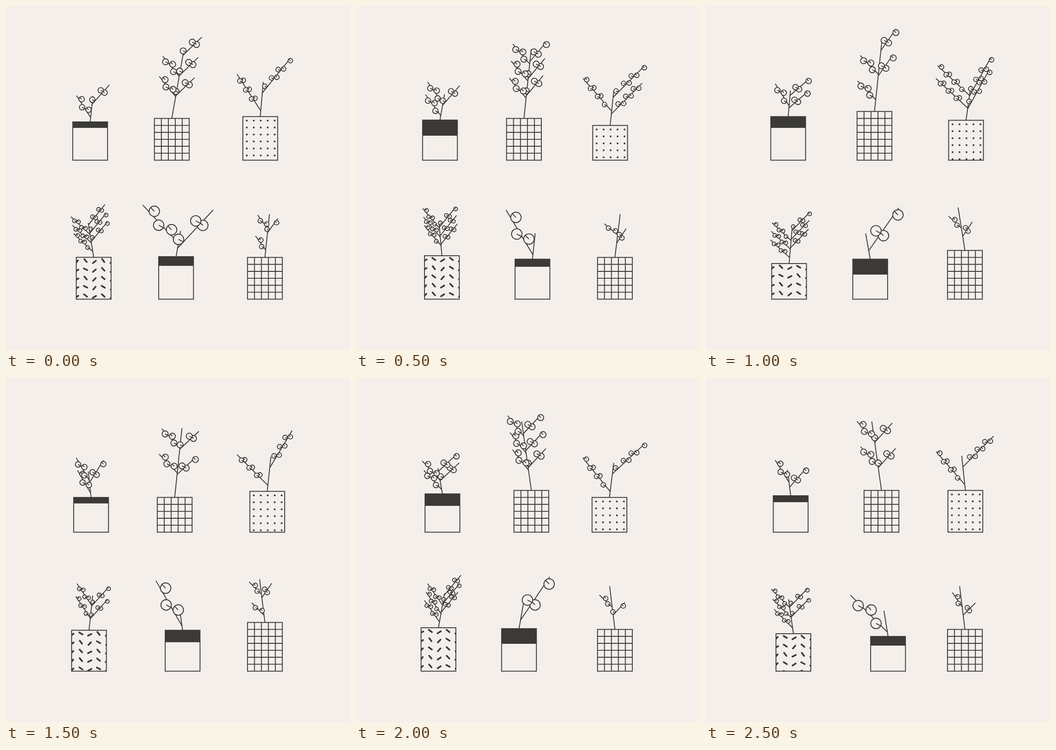
Animation, 748 px wide and 748 px high, one loop 3 s. Source, as an HTML page with a canvas:

```html
<!DOCTYPE html>
<html lang="en">
<head>
<meta charset="utf-8">
<title>Potted plants</title>
<style>
  html, body { margin: 0; width: 100%; height: 100%; overflow: hidden; background: #f4efeb; }
  canvas { display: block; width: 748px; height: 748px; }
</style>
</head>
<body>
<canvas id="stage" width="748" height="748"></canvas>
<script>
const INK = '#3b3a38', PAPER = '#f4efeb', STROKE = 1.9;
const STEP = 500, POSES = 6;
const POT = 75.7, CELL = POT / 5;
const COLUMNS = [185, 374, 563], FLOORS = [335.3, 637.5];
const ctx = document.getElementById('stage').getContext('2d');

// stem and branch are lengths in pot widths.
// A pose is [branches, pot height, stem lean, left splay, right splay, band height], angles in degrees.
// Branches run from the soil up: L or R is the side, a capital puts the first berry on the left.
const plants = [
  { fill: band, stem: 0.75, branch: 0.75, berries: 3, r: 6, poses: [
    ['lR', 83.3, 6, 33, 42, 13], ['LRL', 87.3, 10, 36, 41, 34], ['rLr', 94.8, 5, 32, 49, 24.5],
    ['lrL', 75.6, -6, 30, 32, 13], ['LRlr', 83.3, -10, 43, 47, 26], ['rl', 79.3, -7, 32, 41, 14]] },
  { fill: grid, stem: 2, branch: 0.75, berries: 3, r: 6.6, poses: [
    ['RlRLR', 6 * CELL, 10, 39, 46], ['RlRlrL', 6 * CELL, 6, 40, 40], ['LrLr', 7 * CELL, 6, 44, 35],
    ['rlRL', 5 * CELL, 6, 44, 47], ['RlrlrL', 6 * CELL, -8, 38, 43], ['RLRl', 6 * CELL, -8, 42, 42]] },
  { fill: dots, stem: 1, branch: 1.25, berries: 6, r: 5, poses: [
    ['lR', 94.8, 5, 33, 39], ['rLR', 75.6, 6, 41, 45], ['RlRL', 86.8, 8, 47, 29],
    ['lr', 88.8, 6, 45, 31], ['LR', 75.6, 7, 39, 47], ['Lr', 90.8, -6, 41, 45]] },
  { fill: dashes, stem: 1, branch: 0.75, berries: 4, r: 4.1, poses: [
    ['LRlRlr', 91, -9, 47, 39], ['rLrlRL', 94.5, -5, 40, 39], ['lrlrLR', 77.5, 5, 47, 44],
    ['RLRl', 89, 6, 34, 42], ['lrLRlr', 94.5, 10, 35, 40], ['lRLRL', 81.5, -8, 45, 44]] },
  { fill: band, stem: 0.75, branch: 1.5, berries: 3, r: 11.4, poses: [
    ['Rl', 92.5, 10, 43, 43, 20], ['l', 87, 6, 31, 31, 16.5], ['r', 87, -10, 35, 35, 33.5],
    ['l', 89, -8, 30, 30, 26], ['r', 92.5, 10, 34, 34, 33], ['L', 75.6, -9, 45, 45, 20]] },
  { fill: grid, stem: 1.25, branch: 0.5, berries: 2, r: 5, poses: [
    ['LRl', 6 * CELL, 6, 36, 36], ['rl', 6 * CELL, 7, 50, 33], ['rL', 7 * CELL, -9, 47, 34],
    ['lrL', 7 * CELL, -7, 45, 34], ['RL', 6 * CELL, -7, 47, 42], ['rL', 6 * CELL, -7, 34, 45]] }
];

function line(x0, y0, x1, y1) {
  ctx.beginPath();
  ctx.moveTo(x0, y0);
  ctx.lineTo(x1, y1);
  ctx.stroke();
}

function noise(n) {
  const v = Math.sin(n * 12.9898) * 43758.5453;
  return v - Math.floor(v);
}

// Pot fills are drawn from the pot's top left corner.
function band(height, size) {
  ctx.fillRect(0, 0, POT, size);
}

function grid(height) {
  for (let x = CELL; x < POT - 1; x += CELL) line(x, 0, x, height);
  for (let y = CELL; y < height - 1; y += CELL) line(0, y, POT, y);
}

function dots(height) {
  for (let y = 8.7; y < height; y += CELL) {
    for (let x = 8.6; x < POT; x += CELL) {
      ctx.beginPath();
      ctx.arc(x, y, 2, 0, 7);
      ctx.fill();
    }
  }
}

function dashes(height) {
  ctx.lineWidth = 3.6;
  ctx.lineCap = 'round';
  for (let col = 0; col < 5; col++) {
    const odd = col % 2;
    for (let y = odd ? 7 : 10; y < height + 4; y += 19) {
      const tilt = (25 + 28 * noise(height + col * 7 + y)) * Math.PI / 180;
      const dx = 4.2 * Math.cos(tilt), dy = 4.2 * Math.sin(tilt) * (odd ? 1 : -1);
      const x = 1 + col * 19.2;
      line(x - dx, y - dy, x + dx, y + dy);
    }
  }
}

// Place of shoot i on its parent; left shoots sit a little lower than right ones.
function along(i, count, left) {
  const step = count > 1 ? (0.75 - 0.8 / count) / (count - 1) : 0;
  return 0.25 + i * step + (left ? -0.08 : 0.08);
}

function ray(x, y, length, degrees) {
  const a = degrees * Math.PI / 180;
  const dx = length * Math.sin(a), dy = -length * Math.cos(a);
  return { x, y, tipX: x + dx, tipY: y + dy, at: t => [x + dx * t, y + dy * t] };
}

// Builds the shoots with the foot of the stem at 0, 0.
function grow({ stem, branch, berries, r }, [code, , lean, leftSplay, rightSplay]) {
  const trunk = ray(0, 0, stem * POT, lean);
  const lines = [trunk], fruit = [];
  [...code].forEach((c, i) => {
    const left = c.toUpperCase() === 'L';
    const [x, y] = trunk.at(along(i, code.length, left));
    const twig = ray(x, y, branch * POT, left ? -leftSplay : rightSplay);
    lines.push(twig);
    const parity = c === c.toUpperCase() ? 0 : 1;
    for (let k = 0; k < berries; k++) {
      const onLeft = k % 2 === parity;
      const [nx, ny] = twig.at(along(k, berries, onLeft));
      fruit.push({
        left: onLeft,
        x: nx + r * (onLeft ? -0.97 : 0.93),
        y: ny - r * (onLeft ? 0.44 : 0.18)
      });
    }
  });
  return { lines, fruit };
}

function drawBerry({ x, y, left }, r) {
  const a = (left ? 28 : 225) * Math.PI / 180;
  ctx.beginPath();
  ctx.arc(x, y, r, 0, 7);
  ctx.fill();
  ctx.stroke();
  line(x, y, x + r * Math.cos(a), y + r * Math.sin(a));
}

function drawPlant(plant, index, step) {
  const pose = plant.poses[step], r = plant.r;
  const [, height, , , , size] = pose;
  const { lines, fruit } = grow(plant, pose);

  // Pot and plant together are centred in their column.
  const half = (POT + STROKE) / 2, edge = r + STROKE / 2;
  const lefts = [...lines.map(l => l.tipX - 0.7), ...fruit.map(f => f.x - edge)];
  const rights = [...lines.map(l => l.tipX + 0.7), ...fruit.map(f => f.x + edge)];
  const middle = (Math.min(-half, ...lefts) + Math.max(half, ...rights)) / 2;

  ctx.save();
  ctx.translate(COLUMNS[index % 3] - middle, FLOORS[Math.floor(index / 3)] - height);
  ctx.lineWidth = STROKE;
  ctx.strokeStyle = INK;
  ctx.fillStyle = PAPER;
  for (const l of lines) line(l.x, l.y, l.tipX, l.tipY);
  for (const f of fruit) drawBerry(f, r);

  ctx.translate(-POT / 2, 0);
  ctx.fillStyle = INK;
  ctx.save();
  ctx.beginPath();
  ctx.rect(0, 0, POT, height);
  ctx.clip();
  plant.fill(height, size);
  ctx.restore();
  ctx.strokeRect(0, 0, POT, height);
  ctx.restore();
}

let shown = -1;
function render(time) {
  const step = Math.floor(time / STEP) % POSES;
  if (step === shown) return;
  shown = step;
  ctx.fillStyle = PAPER;
  ctx.fillRect(0, 0, 748, 748);
  plants.forEach((plant, i) => drawPlant(plant, i, step));
}

const begin = performance.now();
function tick() {
  render(performance.now() - begin);
  requestAnimationFrame(tick);
}
tick();
</script>
</body>
</html>
```
